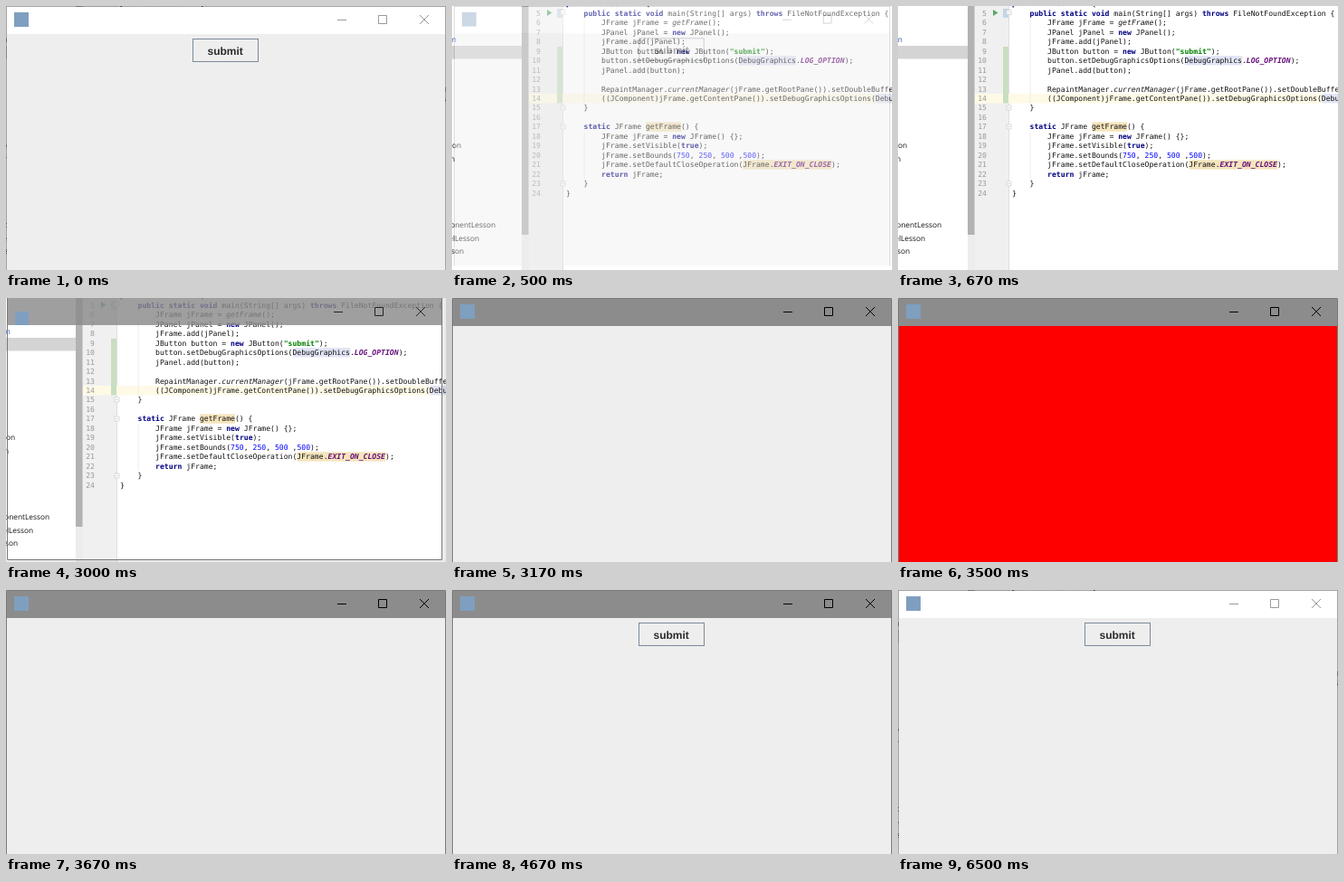
Write an HTML page that moves like this. It is 486x292 px and loops after 6670 ms.

```html
<!DOCTYPE html>
<html lang="en">
<head>
<meta charset="utf-8">
<title>Button repaint debugging</title>
<style>
html, body { margin: 0; width: 100%; height: 100%; overflow: hidden; background: #fff; }
svg { display: block; width: 486px; height: 292px; }
text { white-space: pre; text-rendering: geometricPrecision; }
.code { font: 8.12px "DejaVu Sans Mono", monospace; fill: #111; }
.num { fill: #999; text-anchor: end; }
.tree { font: 8.3px "Open Sans", "Noto Sans", sans-serif; fill: #111; text-anchor: end; }
.key { fill: #000080; font-weight: bold; }
.str { fill: #008000; font-weight: bold; }
.lit { fill: #0000ff; }
.const { fill: #660e7a; font-weight: bold; font-style: italic; }
.call { font-style: italic; }
.label { font: bold 12px "Liberation Sans", Arial, sans-serif; }
</style>
</head>
<body>
<svg id="stage" viewBox="0 0 486 292" width="486" height="292">
  <g id="editor"></g>
  <g id="opening">
    <path d="M481.5 0H486V292H0V289.5H481.5Z" fill="#000" opacity=".08"/>
    <rect x="1" width="480" height="30" fill="#8a8a8a" opacity=".82"/>
    <path d="M1.5 0V289.5H481.5V0" fill="none" stroke="#777"/>
    <rect class="icon" x="10" y="15" width="15" height="15"/>
    <path class="controls" transform="translate(-4 0)" stroke="#222"/>
  </g>
  <g id="win">
    <rect id="title" x="1" y="1" width="484" height="30"/>
    <rect id="pane" x="1" y="31" width="484" height="262"/>
    <path id="edge" d="M.5 293V.5H485.5V293" fill="none"/>
    <rect class="icon" x="9" y="7" width="16" height="16"/>
    <path class="controls" id="controls"/>
    <rect id="border" x="206.5" y="36.5" width="72" height="25" fill="none"/>
    <text id="label" class="label" x="222.5" y="54">submit</text>
  </g>
</svg>
<script>
const LOOP = 6670;
const $ = id => document.getElementById(id);
const set = (id, attrs) => {
  for (const name in attrs) $(id).setAttribute(name, attrs[name]);
};

const FIRST_LINE = 4;
const SOURCE = `public class Main {
    public static void main(String[] args) throws FileNotFoundException {
        JFrame jFrame = getFrame();
        JPanel jPanel = new JPanel();
        jFrame.add(jPanel);
        JButton button = new JButton("submit");
        button.setDebugGraphicsOptions(DebugGraphics.LOG_OPTION);
        jPanel.add(button);

        RepaintManager.currentManager(jFrame.getRootPane()).setDoubleBufferingEnabled(false);
        ((JComponent)jFrame.getContentPane()).setDebugGraphicsOptions(DebugGraphics.FLASH_OPTION);
    }

    static JFrame getFrame() {
        JFrame jFrame = new JFrame() {};
        jFrame.setVisible(true);
        jFrame.setBounds(750, 250, 500 ,500);
        jFrame.setDefaultCloseOperation(JFrame.EXIT_ON_CLOSE);
        return jFrame;
    }
}`.split("\n");

const RULES = [
  ["key", /\b(?:public|class|static|void|throws|new|return|true|false)\b/],
  ["str", /"[^"]*"/],
  ["lit", /\b\d+\b/],
  ["const", /\b[A-Z]+_[A-Z_]+\b/],
  ["call", /currentManager|getFrame(?=\(\);)/]
];
const TOKEN = new RegExp(RULES.map(([name, re]) => `(?<${name}>${re.source})`).join("|"), "g");

function paint(line) {
  return line.replace(TOKEN, (...args) => {
    const groups = args[args.length - 1];
    const kind = Object.keys(groups).find(k => groups[k] !== undefined);
    return `<tspan class="${kind}">${args[0]}</tspan>`;
  });
}

const colX = col => 126 + 4.89 * col;
const lineY = n => 31.7 + (n - 7) * 10.47;
const rect = (x, y, w, h, fill) =>
  `<rect x="${x}" y="${y}" width="${w}" height="${h}" fill="${fill}"/>`;
const mark = (n, col, len, fill) => rect(colX(col), lineY(n) - 8, 4.89 * len, 10.4, fill);

function editor() {
  const out = [
    rect(0, 0, 486, 292, "#fff"),
    rect(0, 44, 77, 14.5, "#d4d4d4"),
    rect(77, 0, 8, 292, "#ededed"),
    rect(77, 0, 7.5, 253, "#b2b2b2"),
    rect(85, 0, 37, 292, "#f0f0f0"),
    rect(122, 0, 1, 292, "#dedede"),
    rect(85, 97, 401, 10.5, "#fffae6"),
    rect(116, 3, 6, 10, "#c3d6e8"),
    rect(116, 45, 6, 62.5, "#c9dec1"),
    rect(145.5, 13, 1, 94, "#ececec"),
    rect(145.5, 139, 1, 52, "#ececec"),
    `<path d="M105 4L110.5 7.5L105 11Z" fill="#59a869"/>`,
    mark(10, 39, 13, "#e2e5f5"),
    mark(14, 70, 13, "#e2e5f5"),
    mark(17, 18, 8, "#f5e5bd"),
    mark(21, 40, 20, "#f5e5bd")
  ];
  for (const y of [7, 112.5, 133.5, 196.5])
    out.push(`<path d="M120 ${y - 2.5}h5v5h-5zM121 ${y}h3" fill="#fff" stroke="#ccc" stroke-width=".7"/>`);

  SOURCE.forEach((line, i) => {
    const n = FIRST_LINE + i;
    const text = line.trimStart();
    const x = colX(line.length - text.length);
    out.push(`<text class="code num" x="98" y="${lineY(n)}">${n}</text>`);
    out.push(`<text class="code" x="${x}" y="${lineY(n)}">${paint(text)}</text>`);
  });

  const tree = [
    ["Main", 4.8, 39.5, "#2a50b8"], ["Button", 10, 157], ["Main", 3, 172],
    ["ComponentLesson", 48, 244.5], ["PanelLesson", 30, 259.5], ["Lesson", 13, 273.5]
  ];
  for (const [name, x, y, fill = "#111"] of tree)
    out.push(`<text class="tree" x="${x}" y="${y}" style="fill:${fill}">${name}</text>`);
  return out.join("");
}

$("editor").innerHTML = editor();
for (const el of document.querySelectorAll(".icon")) el.setAttribute("fill", "#7f9fc0");
for (const el of document.querySelectorAll(".controls")) {
  el.setAttribute("d", "M366 15.5H376M411.5 10.5h9v9h-9zM457 10L467 20M467 10L457 20");
  el.setAttribute("fill", "none");
}

const RED = "#ff0000";
const TEXT = "#2b2b2b";
const EDGE = "#7a8a99";

// Each paint step shows from its time until the next one.
const STEPS = [
  { at: 0, mode: "idle", text: TEXT, border: EDGE },
  { at: 500, mode: "closing", text: TEXT, border: EDGE },
  { at: 670, mode: "hidden" },
  { at: 3000, mode: "opening" },
  { at: 3170, mode: "active" },
  { at: 3500, mode: "active", pane: RED },
  { at: 3670, mode: "active" },
  { at: 3830, mode: "active", text: RED },
  { at: 4000, mode: "active", text: TEXT },
  { at: 4170, mode: "active", text: TEXT, border: RED },
  { at: 4330, mode: "active", text: TEXT, border: EDGE },
  { at: 4500, mode: "active", text: TEXT, border: RED },
  { at: 4670, mode: "active", text: TEXT, border: EDGE },
  { at: 6500, mode: "idle", text: TEXT, border: EDGE }
];

function draw(t) {
  const { mode, pane = "#eeeeee", text = "none", border = "none" } =
    STEPS.filter(s => s.at <= t).pop();
  const active = mode === "active";
  const closing = mode === "closing";
  const shown = active || closing || mode === "idle";

  set("opening", { display: mode === "opening" ? "inline" : "none" });
  set("win", {
    display: shown ? "inline" : "none",
    opacity: closing ? 0.4 : 1,
    transform: closing ? "translate(2 0) scale(.992 .98)" : ""
  });
  set("title", { fill: active ? "#8c8c8c" : "#fff" });
  set("pane", { fill: pane });
  set("edge", { stroke: active ? "#7a7a7a" : "rgba(0,0,0,.36)" });
  set("controls", { stroke: active ? "#000" : "#999" });
  set("label", { fill: text });
  set("border", { stroke: border });
}

const start = performance.now();
function tick() {
  draw((performance.now() - start) % LOOP);
  requestAnimationFrame(tick);
}
tick();
</script>
</body>
</html>
```
